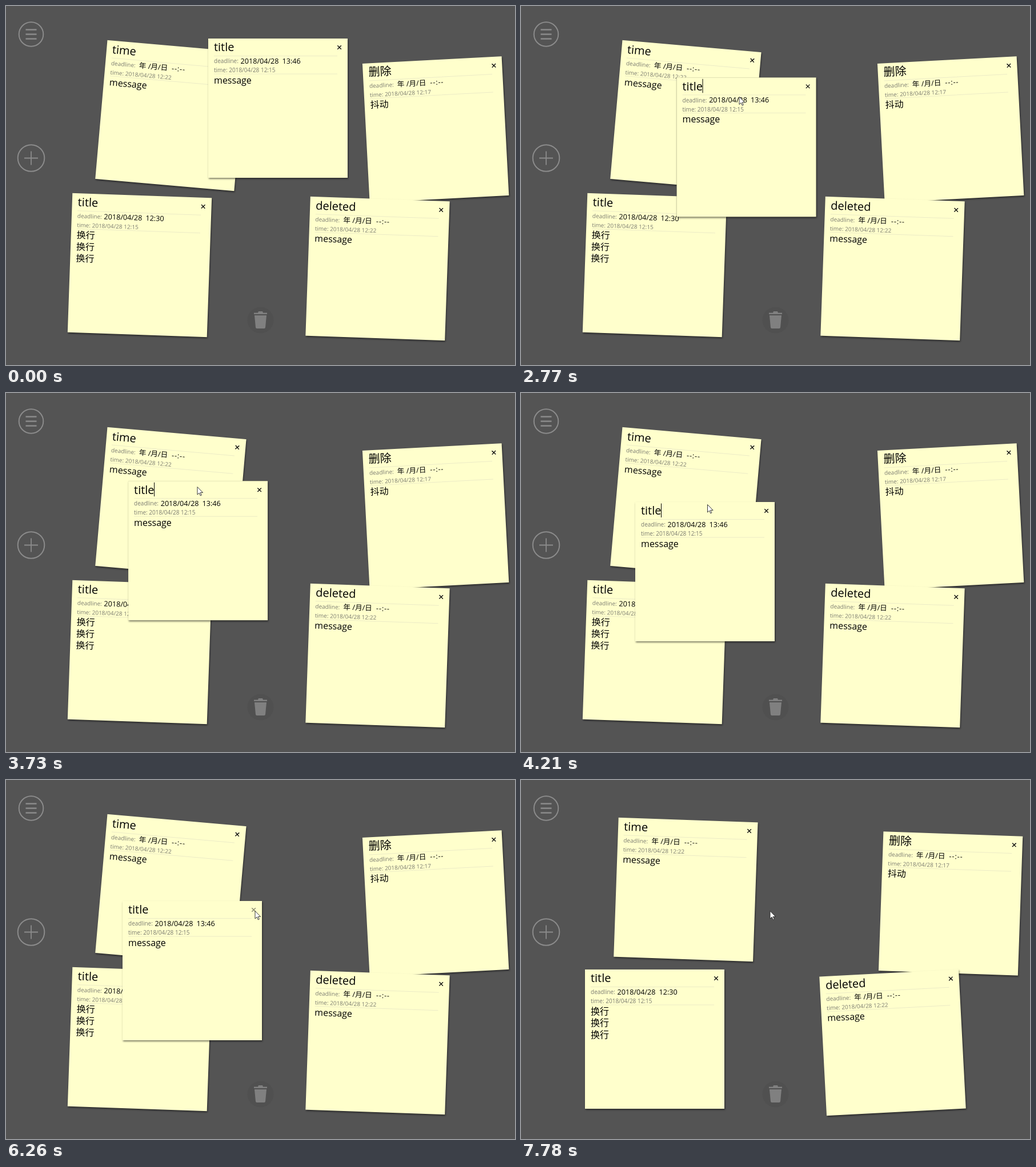
Animation of 891 by 629 pixels, one loop 8000 ms. Source, as an HTML page:

```html
<!DOCTYPE html>
<html lang="zh-CN">
<head>
<meta charset="utf-8">
<title>Sticky notes</title>
<style>
html, body { margin: 0; width: 100%; height: 100%; overflow: hidden; background: #545454; }
svg { display: block; width: 891px; height: 629px; }
text { font-family: "Open Sans", "Noto Sans CJK SC", "Noto Sans CJK", sans-serif; white-space: pre; }
.paper { fill: #ffffcc; filter: drop-shadow(0 0 .6px rgba(0,0,0,.45)) drop-shadow(1.5px 2.5px 1.5px rgba(0,0,0,.5)); }
.title { font-size: 20px; }
.label { font-size: 10px; fill: #7c7c72; }
.date { font-size: 12.6px; }
.body { font-size: 16px; }
.rule { stroke: #ecebc6; }
.close { stroke: #111; stroke-width: 1.4; }
.icon { fill: none; stroke: #8b8b8b; stroke-width: 2; }
</style>
</head>
<body>
<svg viewBox="0 0 891 629">
  <rect width="891" height="629" fill="#545454"/>
  <g class="icon">
    <circle cx="44" cy="49.5" r="21.3"/>
    <path d="M34.5 41.5h19M34.5 49.5h19M34.5 57.5h19" stroke-width="2.4"/>
    <circle cx="44" cy="266.5" r="23.3"/>
    <path d="M32 266.5h24M44 254.5v24" stroke-width="1.8"/>
  </g>
  <circle cx="445.5" cy="550.5" r="23" fill="#505050"/>
  <path fill="#808080" d="M434 537.5h7l1-2.500h7l1 2.500h7v2.500h-23zM435 542h21l-2 21q-.3 2-2 2h-13q-1.700 0-2-2z"/>
  <g id="notes"></g>
  <path id="cursor" d="M0 0V13.500L3.200 10.600 5.300 15.300 7.300 14.400 5.200 9.900H9.600Z"
    fill="#fff" stroke="#222" stroke-width=".9" stroke-linejoin="round"/>
</svg>
<script>
const LOOP = 8000, STEP = 80, SIZE = 244;
const GRAB = 2490, DROP = 4740, BLUR = 5380, HOVER = 6080, REMOVE = 7410, SETTLED = 7780;
const LAG = 70, GRIP = [126.5, 4.5];  // the dragged note trails the pointer
const $ = id => document.getElementById(id);

// Pointer strokes: start, end, target x, y, curve control x, y
const entry = [870, 690];
const strokes = [
  [810, 1370, 552, 99, 325, 30],
  [1520, 1840, 480.5, 61.5, 510, 80],
  [GRAB, 2770, 382, 159, 423, 80],
  [2860, 3170, 394, 131, 350, 275],
  [3250, 3250, 388, 131, 391, 131],
  [3340, 4120, 326.5, 195.5, 318, 160],
  [4590, DROP, 330.5, 216.5, 326, 216],
  [BLUR, 5700, 375, 252, 440, 250],
  [5870, HOVER, 432, 230, 400, 250],
  [6260, 6260, 436, 229.5, 434, 230]
];

const notes = [
  { cx: 288.4, cy: 192, from: 5, to: 2, title: "time", made: "12:22", lines: ["message"] },
  { cx: 752.1, cy: 216.4, from: -3, to: 2, title: "删除", made: "12:17", lines: ["抖动"] },
  { cx: 234, cy: 454, from: 2, to: 0, title: "title", due: "12:30", made: "12:15", lines: ["换行", "换行", "换行"] },
  { cx: 650.5, cy: 460, from: 2, to: -3, title: "deleted", made: "12:22", lines: ["message"] },
  { dragged: true, title: "title", due: "13:46", made: "12:15", lines: ["message"] }
];

function text(cls, x, y, str, extra = "") {
  return `<text class="${cls}" x="${x}" y="${y}" ${extra}>${str}</text>`;
}

function noteMarkup(n) {
  const due = n.due
    ? text("date", 56.6, 43.7, "2018/04/28") + text("date", 129.5, 43.7, n.due)
    : text("date", 59, 43.7, "年") + text("date", 75, 43.7, "/月/日") +
      text("date", 116.5, 43.7, "--:--", 'letter-spacing=".9"');
  return `<rect class="paper" width="${SIZE}" height="${SIZE}"/>
    <path class="rule" d="M10 30.500H226M10 62H226"/>
    ${text("title", 10, 22.4, n.title)}
    ${text("label", 10, 43.2, "deadline:")}${due}
    ${text("label", 10, 59.2, "time: 2018/04/28 " + n.made)}
    ${n.lines.map((s, i) => text("body", 10, 78.7 + 20.4 * i, s)).join("")}
    <path class="close" d="M226.300 12.300l6.500 6.500M232.800 12.300l-6.500 6.500"/>
    ${n.dragged ? '<path id="caret" d="M45.500 2.500V27" stroke="#000"/>' : ""}`;
}

for (const n of notes) {
  n.el = document.createElementNS("http://www.w3.org/2000/svg", "g");
  n.el.innerHTML = noteMarkup(n);
  $("notes").append(n.el);
}
const dragged = notes.find(n => n.dragged);
const closeMark = dragged.el.querySelector(".close");

// Progress in even steps: the first at start, the last at end
function progress(t, start, end) {
  if (t < start) return 0;
  if (t >= end) return 1;
  const n = Math.round((end - start) / STEP);
  return (Math.floor((t - start) / (end - start) * n) + 1) / (n + 1);
}

const curve = (a, c, b, k) => (1 - k) ** 2 * a + 2 * k * (1 - k) * c + k * k * b;

function pointer(t) {
  let [x, y] = entry;
  for (const [start, end, tx, ty, cx, cy] of strokes) {
    const k = progress(t, start, end);
    x = curve(x, cx, tx, k);
    y = curve(y, cy, ty, k);
  }
  return [x, y];
}

const show = (el, on) => el.setAttribute("visibility", on ? "inherit" : "hidden");
const move = (el, [x, y], turn = "") => el.setAttribute("transform", `translate(${x} ${y})${turn}`);

function draw(t) {
  const p = progress(t, REMOVE, SETTLED);
  const ease = p * p * (3 - 2 * p);
  for (const n of notes) {
    if (n.dragged) continue;
    const angle = n.from + (n.to - n.from) * ease;
    move(n.el, [n.cx, n.cy], ` rotate(${angle}) translate(${-SIZE / 2} ${-SIZE / 2})`);
  }
  const held = Math.min(DROP, Math.max(GRAB - 1, t - LAG));
  move(dragged.el, pointer(held).map((v, i) => v - GRIP[i]));
  move($("cursor"), pointer(t));
  show(dragged.el, t < REMOVE);
  show($("caret"), t >= GRAB && t < BLUR);
  closeMark.setAttribute("opacity", t >= HOVER ? 0.5 : 1);
}

const begin = performance.now();
function tick() {
  draw((performance.now() - begin) % LOOP);
  requestAnimationFrame(tick);
}
tick();
</script>
</body>
</html>
```
